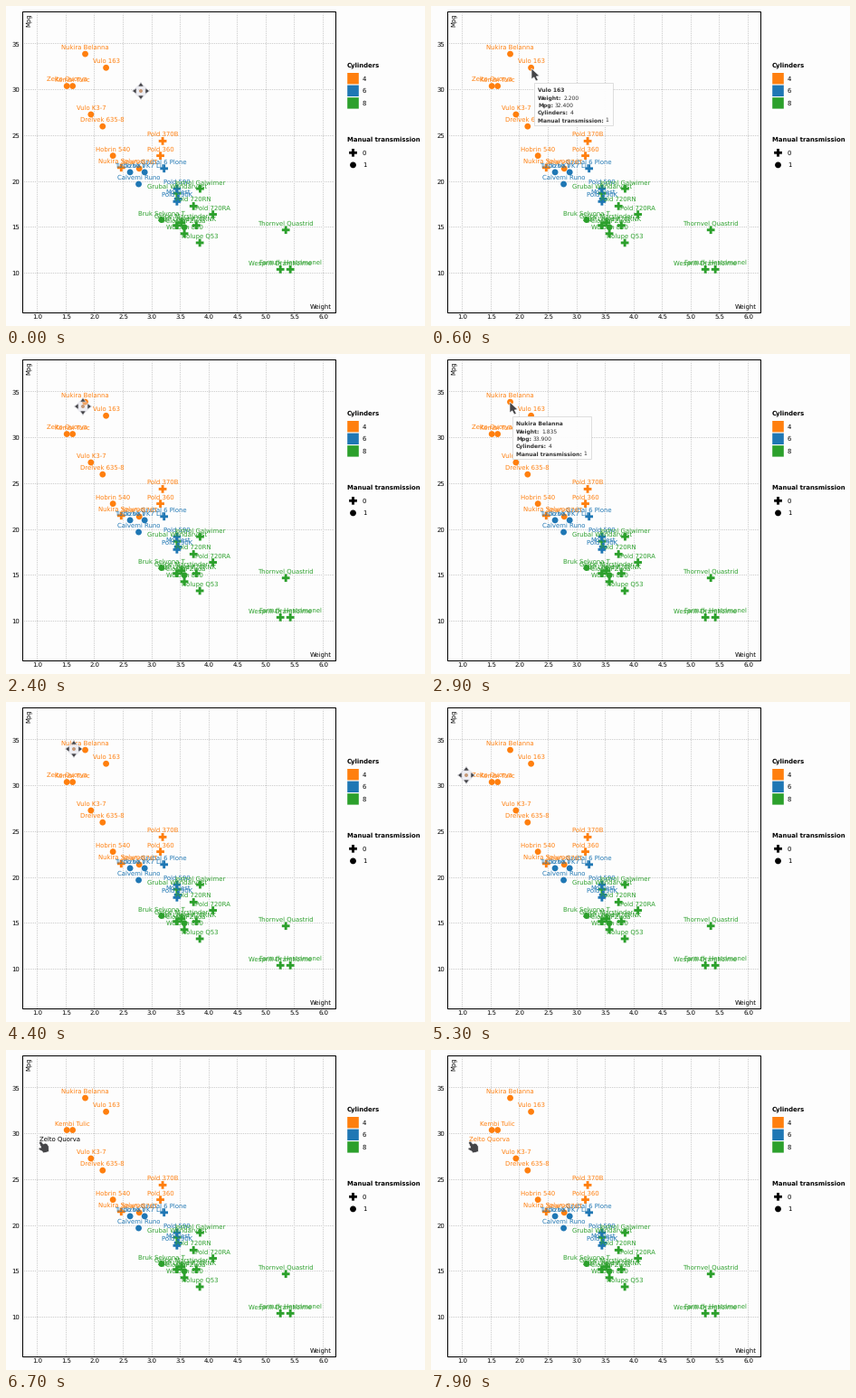
These frames come from a looping animation (463x354 px, 8000 ms). A matplotlib script:

```python
import matplotlib.pyplot as plt
import numpy as np
from matplotlib.animation import FuncAnimation
from matplotlib.patches import Circle, Polygon, Rectangle
from matplotlib.transforms import Affine2D

WIDTH, HEIGHT, DPI = 463, 354, 64
STEP_MS, LOOP_MS = 100, 8000
PT = 72 / DPI  # points per pixel
COLORS = {4: "#ff7f0e", 6: "#1f77b4", 8: "#2ca02c"}

# name, mpg, cylinders, weight, manual transmission
CARS = [
    ("Tizbo VK7", 21.0, 6, 2.620, 1),
    ("Tizbo VK7 Lin", 21.0, 6, 2.875, 1),
    ("Hobrin 540", 22.8, 4, 2.320, 1),
    ("Grubal 6 Plone", 21.4, 6, 3.215, 0),
    ("Grubal Wendarvost", 18.7, 8, 3.440, 0),
    ("Morvest", 18.1, 6, 3.460, 0),
    ("Wolben 850", 14.3, 8, 3.570, 0),
    ("Pold 370B", 24.4, 4, 3.190, 0),
    ("Pold 360", 22.8, 4, 3.150, 0),
    ("Pold 590", 19.2, 6, 3.440, 0),
    ("Pold 590K", 17.8, 6, 3.440, 0),
    ("Pold 720RA", 16.4, 8, 4.070, 0),
    ("Pold 720RN", 17.3, 8, 3.730, 0),
    ("Pold 720RNK", 15.2, 8, 3.780, 0),
    ("Wesprill Dramholme", 10.4, 8, 5.250, 0),
    ("Farnulk Hestrimonel", 10.4, 8, 5.424, 0),
    ("Thornvel Quastrid", 14.7, 8, 5.345, 0),
    ("Vulo 163", 32.4, 4, 2.200, 1),
    ("Kembi Tulic", 30.4, 4, 1.615, 1),
    ("Nukira Belanna", 33.9, 4, 1.835, 1),
    ("Nukira Selume", 21.5, 4, 2.465, 0),
    ("Gulpe Marstinder", 15.5, 8, 3.520, 0),
    ("ZQP Lorvein", 15.2, 8, 3.435, 0),
    ("Nolupe Q53", 13.3, 8, 3.840, 0),
    ("Jestrol Galwimer", 19.2, 8, 3.845, 0),
    ("Vulo K3-7", 27.3, 4, 1.935, 1),
    ("Drelvek 635-8", 26.0, 4, 2.140, 1),
    ("Zelto Quorva", 30.4, 4, 1.513, 1),
    ("Bruk Selvona T", 15.8, 8, 3.170, 1),
    ("Calvemi Runo", 19.7, 6, 2.770, 1),
    ("Pelorani Zuda", 15.0, 8, 3.570, 1),
    ("Snarv 376T", 21.4, 4, 2.780, 1),
]
DRAGGED = "Zelto Quorva"

# Pointer path: time in ms, x, y
PATH = np.array([
    (0, 149, 94), (600, 111, 69), (1100, 111, 69), (1400, 110, 68),
    (2000, 110, 68), (2400, 85, 58), (2900, 87, 53), (4300, 87, 53),
    (4400, 75, 52), (5300, 39, 81), (5700, 44.5, 83), (6300, 44.5, 83),
    (6700, 37, 101), (7000, 42, 101), (LOOP_MS, 42, 101),
])
HAND_MS, PRESS_MS, DRAG_MS, RELEASE_MS = 5600, 5900, 6400, 7800

plt.rcParams["font.family"] = "DejaVu Sans"
plt.rcParams["text.hinting"] = "none"
fig = plt.figure(figsize=(WIDTH / DPI, HEIGHT / DPI), dpi=DPI, facecolor="#fdfdfd")
ax = fig.add_axes([0, 0, 1, 1])
ax.set(xlim=(0, WIDTH), ylim=(HEIGHT, 0))
ax.axis("off")


def x_px(weight):
    return 34.8 + 63.15 * (weight - 1)


def y_px(mpg):
    return 41.9 + 10.14 * (35 - mpg)


def write(x, y, text, size=6.85, **style):
    style = {"color": "black", "va": "baseline", **style}
    return ax.text(x, y, text, fontsize=size * PT, **style)


def block(x, y, width, height, color):
    """Filled rectangle around a centre, free of pixel snapping."""
    ax.add_patch(Rectangle((x - width / 2, y - height / 2), width, height,
                           color=color, lw=0, snap=False, zorder=3))


def mark(x, y, manual, color):
    if manual:
        ax.add_patch(Circle((x, y), 3.4, color=color, lw=0, zorder=3))
    else:
        block(x, y, 8.7, 2.9, color)
        block(x, y, 2.9, 8.7, color)


def grid_line(xs, ys):
    ax.plot(xs, ys, color="#cccccc", lw=PT, ls=(0.5, (1, 1)),
            dash_capstyle="butt", zorder=1)


def draw_axes():
    for weight in np.arange(1, 6.5, 0.5):
        x = x_px(weight)
        grid_line([x - 0.5] * 2, [6, 339])
        write(x, 346, f"{weight:.1f}", ha="center")
    for mpg in range(10, 40, 5):
        y = y_px(mpg)
        grid_line([18, 364], [y - 0.5] * 2)
        write(15, y + 2.7, str(mpg), ha="right")
    ax.add_patch(Rectangle((18, 6), 346, 333, fill=False, ec="black",
                           lw=PT, zorder=2))
    write(359.5, 335, "Weight", ha="right")
    write(27, 8.5, "Mpg", rotation=90, rotation_mode="anchor", ha="right")


def draw_legend():
    write(377, 67, "Cylinders", weight="bold")
    for row, (count, color) in enumerate(COLORS.items()):
        y = 80.2 + 13.6 * row
        block(383.5, y, 12.6, 12.4, color)
        write(394, y + 2.6, str(count))
    write(377, 149.5, "Manual transmission", weight="bold")
    for manual in range(2):
        y = 162.3 + 13.6 * manual
        mark(383.5, y, manual, "black")
        write(394, y + 2.6, str(manual))


def draw_cars():
    labels = {}
    for name, mpg, cylinders, weight, manual in CARS:
        x, y = x_px(weight), y_px(mpg)
        mark(x, y, manual, COLORS[cylinders])
        labels[name] = write(x, y - 5, name, ha="center",
                             color=COLORS[cylinders], zorder=4)
    return labels


draw_axes()
draw_legend()
labels = draw_cars()
label_home = np.array(labels[DRAGGED].get_position())

# Everything that follows the pointer is drawn around its hot spot.
shift = Affine2D()
follow = shift + ax.transData


def cursor_polygon(points, halo="#ffffff"):
    return ax.add_patch(Polygon(points, fc="#454548", ec=halo, lw=0.6 * PT,
                                joinstyle="round", transform=follow, zorder=9))


def move_cursor():
    parts = [Circle((0, 0), 7, fc="#d9d9e4", alpha=0.4, lw=0),
             Circle((0, 0), 2, fc="#c79a78", lw=0)]
    for part in parts:
        part.set(transform=follow, zorder=8)
        ax.add_patch(part)
    head = np.array([(0, -9.5), (3.2, -5), (-3.2, -5)])
    for turn in range(4):
        points = Affine2D().rotate_deg(90 * turn).transform(head)
        parts.append(cursor_polygon(points, "#d8d8e0"))
    return parts


def arrow_cursor():
    return [cursor_polygon([(0, 0), (0, 12), (2.8, 9.8), (5, 14), (7.3, 12.8),
                            (5.3, 9), (9, 8.5)])]


def hand_cursor():
    return [cursor_polygon([(-0.5, 1.6), (0.8, -0.2), (2.4, 0.6), (4.3, 3), (6.3, 2),
                            (8.6, 3), (10.2, 5.5), (10.3, 11.5), (4.3, 13),
                            (2.8, 11), (-0.8, 9.2), (-1, 7.2), (1.8, 7)])]


def tooltip():
    box = ax.add_patch(Rectangle((3, 16), 87, 47, fc="#fdfdfd", ec="#dddddd",
                                 lw=PT, alpha=0.95, transform=follow, zorder=6))
    heads, values = [], []
    captions = ("", "Weight:", "Mpg:", "Cylinders:", "Manual transmission:")
    for row, caption in enumerate(captions):
        head = write(7, 26.3 + 8.3 * row, caption, 6, weight="bold",
                     color="#333333", transform=follow, zorder=7)
        heads.append(head)
        if caption:
            values.append(ax.annotate(
                "", (1, 0), xycoords=head, xytext=(2 * PT, 0),
                textcoords="offset points", va="bottom", fontsize=6 * PT,
                color="#333333", zorder=7))
    return [box, *heads, *values], heads[0], values


cursors = {"move": move_cursor(), "arrow": arrow_cursor(), "hand": hand_cursor()}
tip_parts, tip_title, tip_values = tooltip()


def pointer(ms):
    return np.array([np.interp(ms, PATH[:, 0], PATH[:, k]) for k in (1, 2)])


def car_under(x, y):
    for car in CARS:
        if np.hypot(x_px(car[3]) - x, y_px(car[1]) - y) < 3.6:
            return car
    return None


def show(parts, visible):
    for part in parts:
        part.set_visible(visible)


def update(frame):
    ms = frame * STEP_MS
    spot = pointer(ms)
    shift.clear().translate(*spot)

    car = car_under(*spot)
    kind = "hand" if ms >= HAND_MS else "arrow" if car else "move"
    for name, parts in cursors.items():
        show(parts, name == kind)

    show(tip_parts, car is not None)
    if car:
        name, mpg, cylinders, weight, manual = car
        tip_title.set_text(name)
        texts = (f"{weight:.3f}", f"{mpg:.3f}", str(cylinders), str(manual))
        for value, text in zip(tip_values, texts):
            value.set_text(text)

    moved = spot - pointer(DRAG_MS - STEP_MS) if ms >= DRAG_MS else np.zeros(2)
    pressed = PRESS_MS <= ms < RELEASE_MS
    labels[DRAGGED].set_position(label_home + moved)
    labels[DRAGGED].set_color("black" if pressed else COLORS[4])
    return []


anim = FuncAnimation(fig, update, frames=LOOP_MS // STEP_MS, interval=STEP_MS,
                     repeat=True, repeat_delay=0, blit=False)
plt.show()
```
